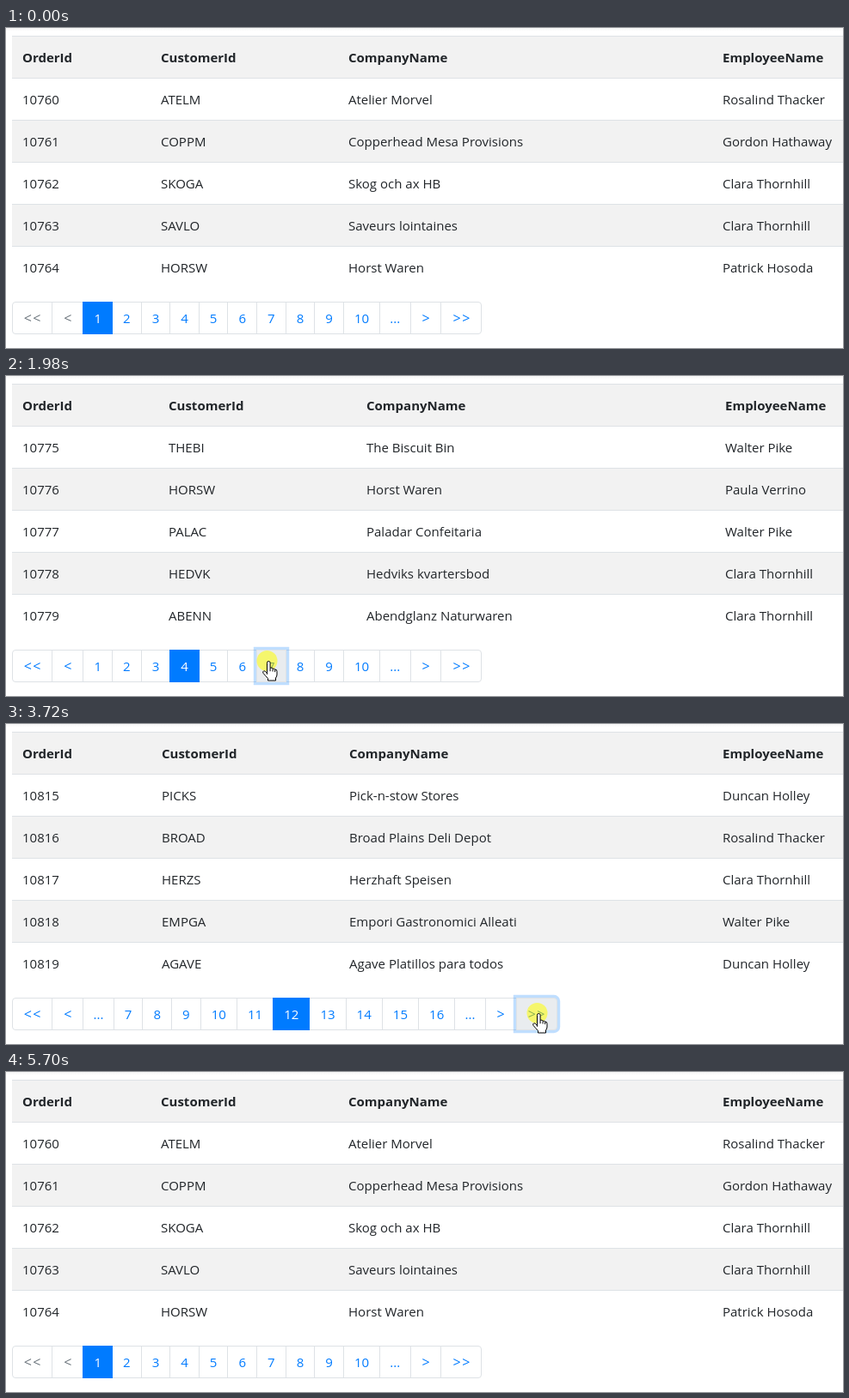
An HTML page that plays this animation: 973 by 373 pixels, repeating every 5960 ms.

```html
<!DOCTYPE html>
<html lang="en">
<head>
<meta charset="utf-8">
<title>Paged order table</title>
<style>
  html, body { margin: 0; width: 100%; height: 100%; overflow: hidden; background: #fff; }
  body { position: relative; font: 15px/24px "Open Sans", "Noto Sans", sans-serif; color: #212529; }
  body::before { content: ""; position: absolute; width: 100%; height: 4px; background: linear-gradient(#f6f6f6, #fff); }
  #table { position: absolute; left: 7px; right: 0; top: 9px; }
  .row { position: relative; height: 48px; border-top: 1px solid #dee2e6; }
  .row:nth-child(odd) { background: #f2f2f2; }
  .row:first-child { font-weight: 700; }
  .row span { position: absolute; top: 12px; white-space: nowrap; }
  #pager { position: absolute; left: 6.6px; display: flex; }
  #pager span {
    position: relative; flex: none; box-sizing: border-box; height: 38px; padding: 8px 0;
    margin-right: -1px; border: 1px solid #dee2e6; background: #fff; color: #007bff;
    line-height: 20px; text-align: center;
  }
  #pager span:first-child { border-radius: 4px 0 0 4px; }
  #pager span:last-child { border-radius: 0 4px 4px 0; }
  #pager .arrow { font-size: 16px; letter-spacing: 1.5px; text-indent: 1.5px; }
  #pager .off { color: #6c757d; }
  #pager .on { z-index: 3; background: #007bff; border-color: #007bff; color: #fff; }
  #pager .hover { z-index: 2; background: #e9ecef; color: #0056b3; }
  #pager .focus { z-index: 4; box-shadow: 0 0 0 3.2px rgba(0, 123, 255, .25); }
  svg { position: absolute; left: 0; top: 0; width: 973px; height: 373px; z-index: 9; }
  svg path { fill: #fff; stroke: #000; stroke-width: 1; stroke-linejoin: round; }
</style>
</head>
<body>
<div id="table"></div>
<div id="pager"></div>
<svg>
  <circle id="click" r="12" fill="#ff0" fill-opacity=".55"/>
  <path id="arrow" d="M.5 .5V16.5l3.7-3.5 2.4 5.5 2.3-1-2.4-5.3h5Z"/>
  <path id="hand" d="M5.5 15.5V2.3a1.8 1.8 0 0 1 3.6 0V8.2q2.6-.6 3 1 2-.6 2.6.9 2.3-.4 2.3 2.2V16q0 2-1.5 4v3h-9v-2.5Q4 18 1 14.3q-1-1.6.6-2.4 1.4-.5 2.6 1.1l1.3 1.8ZM9.1 8.2v4M12.1 9.2v3.3M14.7 10.1v3"/>
</svg>
<script>
const LOOP = 5960, PAGES = 64;
const HEAD = ["OrderId", "CustomerId", "CompanyName", "EmployeeName"];

const staff = {
  R: "Rosalind Thacker", G: "Gordon Hathaway", C: "Clara Thornhill", P: "Patrick Hosoda",
  W: "Walter Pike", V: "Paula Verrino", D: "Duncan Holley", F: "Fiona Brannock"
};

const firms = {
  ATELM: "Atelier Morvel", COPPM: "Copperhead Mesa Provisions", SKOGA: "Skog och ax HB",
  SAVLO: "Saveurs lointaines", HORSW: "Horst Waren", THEBI: "The Biscuit Bin",
  PALAC: "Paladar Confeitaria", HEDVK: "Hedviks kvartersbod", ABENN: "Abendglanz Naturwaren",
  TALHO: "Talhoflieferant", BORZD: "Borzycki Dwór", BEYOC: "Beyond the Cove",
  OBAQU: "Oba Quitute", PICKS: "Pick-n-stow Stores", BROAD: "Broad Plains Deli Depot",
  HERZS: "Herzhaft Speisen", EMPGA: "Empori Gastronomici Alleati",
  AGAVE: "Agave Platillos para todos", ZUMKA: "Zumbrink Kaufladen", FINGO: "Fin goût'"
};

// Column positions, then customer:employee for each row
const pages = {
  1: [[180, 398, 833], "ATELM:R COPPM:G SKOGA:C SAVLO:C HORSW:P"],
  4: [[189, 419, 836], "THEBI:W HORSW:V PALAC:W HEDVK:C ABENN:C"],
  7: [[197, 437, 823], "PALAC:P TALHO:P BORZD:V BEYOC:C OBAQU:P"],
  12: [[181, 399, 833], "PICKS:D BROAD:R HERZS:C EMPGA:W AGAVE:D"],
  64: [[180, 398, 833], "ZUMKA:F FINGO:R COPPM:V"]
};

// start, page, cursor, x, y, hovered button, focused, click mark
const steps = [
  [0, 1],
  [250, 1, "arrow", 198, 364],
  [480, 1, "hand", 184, 349, "4"],
  [720, 1, "hand", 198, 344, "4"],
  [980, 1, "hand", 203, 341, "4", true, true],
  [1210, 4, "hand", 206, 339],
  [1470, 4, "hand", 236, 339, "5"],
  [1740, 4, "hand", 301, 336, "7"],
  [1980, 4, "hand", 298, 332, "7", true, true],
  [2230, 7, "hand", 297, 331],
  [2470, 7, "hand", 487, 337, "..."],
  [2730, 7, "hand", 487, 337, "...", true],
  [2960, 12, "hand", 485, 341, "16"],
  [3220, 12, "hand", 576, 345, ">"],
  [3460, 12, "hand", 608, 342, ">>"],
  [3720, 12, "hand", 612, 337, ">>", true, true],
  [3950, 64, "hand", 612, 337],
  [4210, 64, "arrow", 469, 354],
  [4470, 64, "arrow", 150, 309],
  [4710, 64, "hand", 56, 257],
  [4970, 64, "hand", 30, 241, "<<"],
  [5210, 64, "hand", 28, 236, "<<", true, true],
  [5460, 1, "hand", 28, 236],
  [5700, 1]
];

const $ = id => document.getElementById(id);

function add(parent, tag, text = "", cls = "") {
  const node = document.createElement(tag);
  node.textContent = text;
  node.className = cls;
  parent.append(node);
  return node;
}

function drawTable(page) {
  const [cols, list] = pages[page];
  const rows = list.split(" ").map((item, i) => {
    const [code, who] = item.split(":");
    return [10755 + 5 * page + i, code, firms[code], staff[who]];
  });
  $("table").replaceChildren();
  for (const cells of [HEAD, ...rows]) {
    const row = add($("table"), "div", "", "row");
    cells.forEach((text, i) => add(row, "span", text).style.left = [19, ...cols][i] - 7 + "px");
  }
  $("pager").style.top = 74 + 49 * rows.length + "px";
}

const charWidth = c => c === "." ? 3.47 : /\d/.test(c) ? 8.62 : 10.94;

function drawPager(page, over, focused) {
  const first = Math.max(1, Math.min(page - 5, PAGES - 9));
  const labels = ["<<", "<"];
  if (first > 1) labels.push("...");
  for (let n = first; n < first + 10; n++) labels.push(String(n));
  if (first + 9 < PAGES) labels.push("...");
  labels.push(">", ">>");

  const hovered = labels.lastIndexOf(over);
  $("pager").replaceChildren();
  labels.forEach((label, i) => {
    const button = add($("pager"), "span", label);
    const flags = {
      arrow: /[<>]/.test(label),
      off: page === 1 && label[0] === "<" || page === PAGES && label[0] === ">",
      on: label === String(page),
      hover: i === hovered,
      focus: i === hovered && focused
    };
    for (const name in flags) button.classList.toggle(name, !!flags[name]);
    button.style.width = 26 + [...label].reduce((sum, c) => sum + charWidth(c), 0) + "px";
  });
}

function place(id, shown, x, y) {
  $(id).style.display = shown ? "" : "none";
  if (shown) $(id).setAttribute("transform", `translate(${x} ${y})`);
}

let current;
function tick(now) {
  const step = steps.findLast(s => s[0] <= now % LOOP) || steps[0];
  if (step !== current) {
    const [, page, cursor, x, y, over, focused, clicked] = current = step;
    drawTable(page);
    drawPager(page, over, focused);
    place("arrow", cursor === "arrow", x, y);
    place("hand", cursor === "hand", x, y);
    place("click", clicked, x + 5.5, y);
  }
  requestAnimationFrame(tick);
}
tick(0);
</script>
</body>
</html>
```
